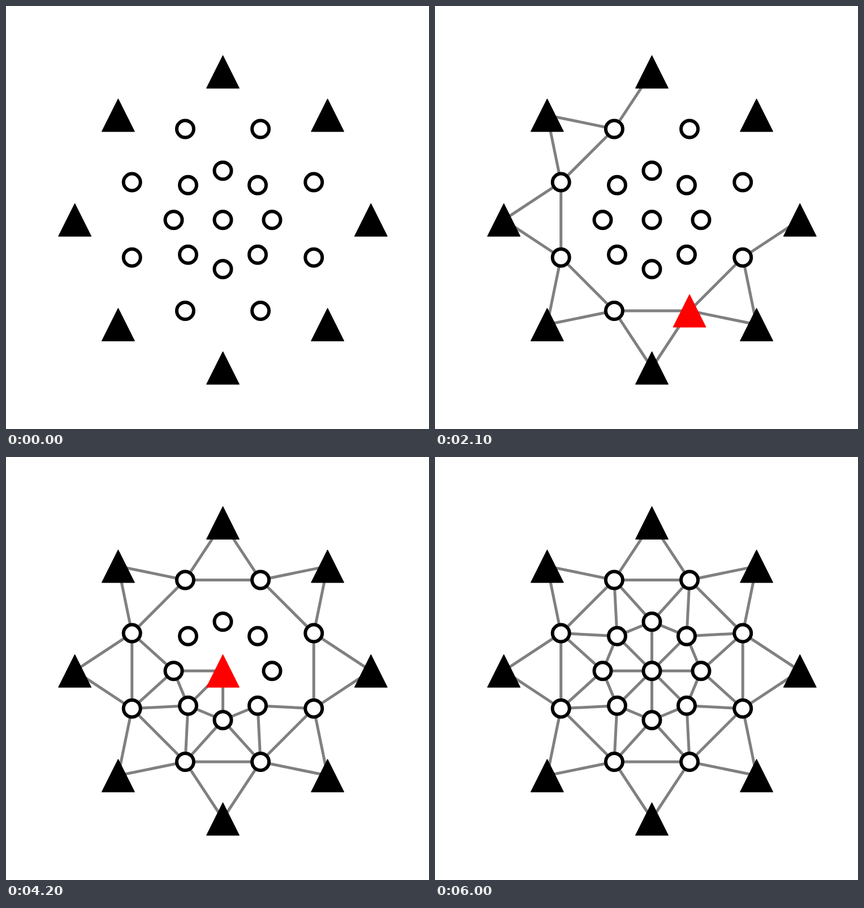
These frames come from a looping animation (748 by 748 pixels, 6.5 s). An HTML page:

```html
<!DOCTYPE html>
<html lang="en">
<head>
<meta charset="utf-8">
<title>Network build-up</title>
<style>
  html, body { margin: 0; width: 100%; height: 100%; overflow: hidden; background: #fff; }
  svg { display: block; width: 100vw; height: 100vh; }
  line { stroke: #808080; stroke-width: 5; }
  circle { fill: #fff; stroke: #000; stroke-width: 6; }
  polygon { fill: #000; stroke: #000; stroke-width: 1; stroke-linejoin: round; }
  .active { fill: #f00; stroke: #f00; }
</style>
</head>
<body>
<svg id="stage" viewBox="0 0 748 748"></svg>
<script>
const NS = 'http://www.w3.org/2000/svg';
const stage = document.getElementById('stage');
const CENTER = { x: 383.5, y: 378.2 };
const LOOP = 6500, START = 500, STEP = 100;

// T: outer triangles, O: outer ring, I: inner ring, C: centre.
// Ring positions count clockwise from the top.
const rings = {
  T: { radius: 261.8, turn: 0 },
  O: { radius: 174, turn: 0.5 },
  I: { radius: 87, turn: 0 }
};

// Each active node and the neighbours it links to, in order.
const plan = `
  O4: T4 T5
  O5: O4 T5 T6
  O6: O5 T6 T7 O7
  O3: O4 T4 T3
  O2: T3 T2
  O7: T7 T0
  O3: O2
  O0: O7 T0 T1
  O1: O0 O2 T1 T2
  I4: O4 O3
  I3: O3 O2
  I5: O4 O5 I4
  I3: I4
  I6: O5 O6 I5
  C: I6 I5 I4 I3
  I7: O6 O7 I6 C
  I2: O1 O2 I3 C
  I1: O0 O1 I2 C
  I0: O7 O0 I7 I1 C`;

function add(tag, attrs) {
  const el = document.createElementNS(NS, tag);
  for (const key in attrs) el.setAttribute(key, attrs[key]);
  return stage.appendChild(el);
}

function place(name) {
  const ring = rings[name[0]];
  if (!ring) return CENTER;
  const angle = (Number(name[1]) + ring.turn) * Math.PI / 4;
  return {
    x: CENTER.x + ring.radius * Math.sin(angle),
    y: CENTER.y - ring.radius * Math.cos(angle)
  };
}

function triangle({ x, y }) {
  const h = 29;
  return `${x},${y - h} ${x + h},${y + h} ${x - h},${y + h}`;
}

const show = (el, on) => el.setAttribute('visibility', on ? 'visible' : 'hidden');

const links = plan.trim().split('\n').flatMap(row => {
  const [from, targets] = row.trim().split(': ');
  return targets.split(' ').map(to => {
    const a = place(from), b = place(to);
    return { from, el: add('line', { x1: a.x, y1: a.y, x2: b.x, y2: b.y }) };
  });
});

const circles = {};
function addCircle(name) {
  const { x, y } = place(name);
  circles[name] = add('circle', { cx: x, cy: y, r: 15 });
}

for (let i = 0; i < 8; i++) {
  add('polygon', { points: triangle(place('T' + i)) });
  addCircle('O' + i);
  addCircle('I' + i);
}
addCircle('C');
const marker = add('polygon', { class: 'active' });

let shown = -1;
function draw(time) {
  const t = time % LOOP;
  const count = t < START ? 0 : Math.min(links.length, Math.floor((t - START) / STEP) + 1);
  if (count === shown) return;
  shown = count;

  const busy = count > 0 && count < links.length;
  const active = busy ? links[count - 1].from : '';
  links.forEach((link, i) => show(link.el, i < count));
  for (const name in circles) show(circles[name], name !== active);
  show(marker, busy);
  if (busy) marker.setAttribute('points', triangle(place(active)));
}

const begin = performance.now();
function tick() {
  draw(performance.now() - begin);
  requestAnimationFrame(tick);
}
tick();
</script>
</body>
</html>
```
